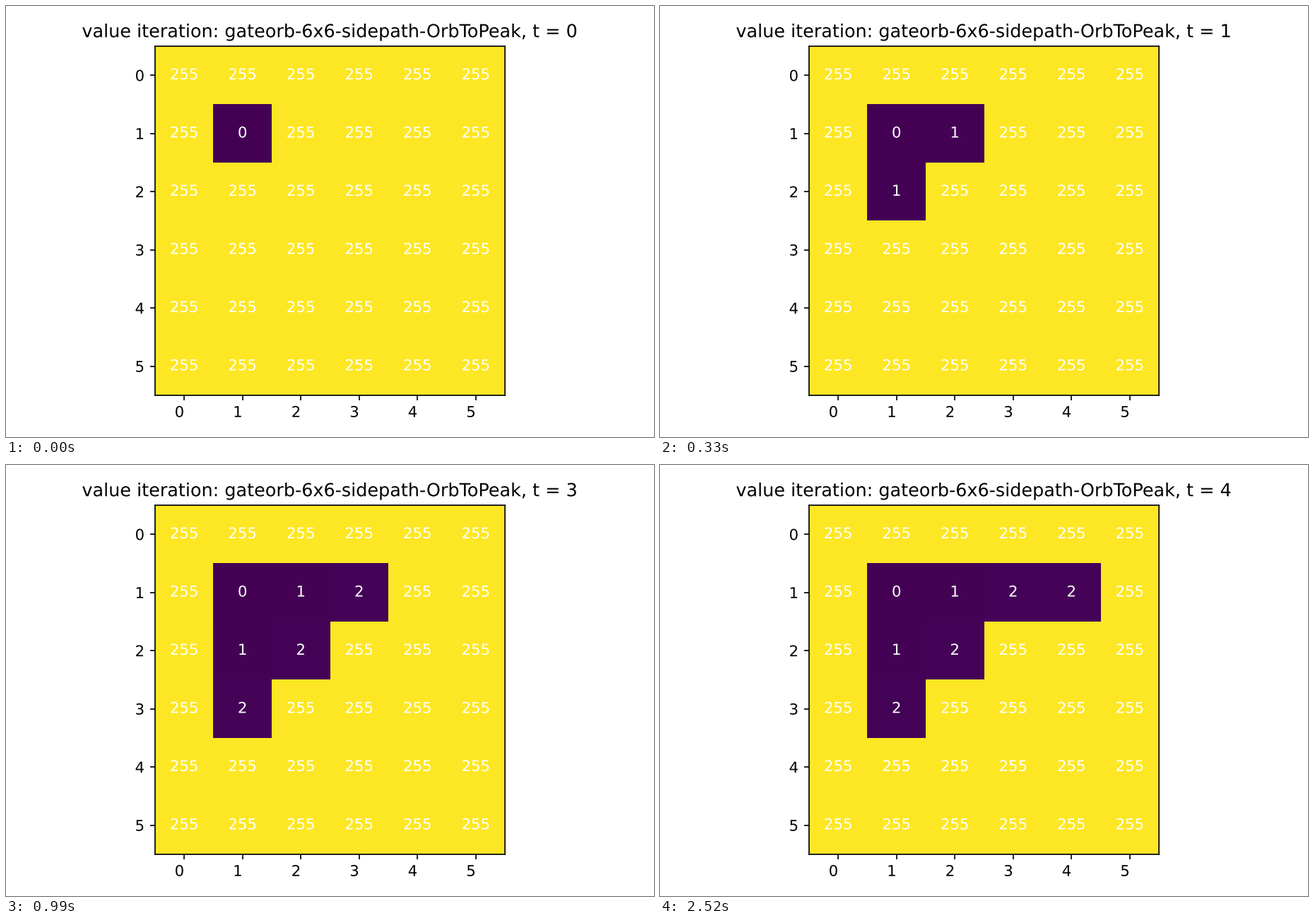
These frames come from a looping animation (917x611 px, 3.32 s). A matplotlib script:

```python
import numpy as np
import matplotlib.pyplot as plt
from matplotlib.animation import FuncAnimation
from matplotlib.patheffects import Normal
from matplotlib.text import Text

W, H, DPI = 917, 611, 128
PT = W / 6 / DPI          # point scale for a six inch wide figure
INTERVAL = 10             # ms per tick
LOOP = 3320
STEP = 330                # ms per iteration
LAST = 4
N = 6
UNSEEN = 255
TITLE = "value iteration: gateorb-6x6-sidepath-OrbToPeak, t = {}"

# (row, column, value, iteration at which the cell is reached)
REACHED = [
    (1, 1, 0, 0),
    (1, 2, 1, 1), (2, 1, 1, 1),
    (1, 3, 2, 2), (2, 2, 2, 2),
    (3, 1, 2, 3),
    (1, 4, 2, 4),
]

plt.rcParams.update({
    "font.family": "DejaVu Sans",
    "text.hinting": "none",
    "axes.linewidth": 0.8 * PT,
})


def values(t):
    grid = np.full((N, N), UNSEEN)
    for row, col, value, start in REACHED:
        if t >= start:
            grid[row, col] = value
    return grid


fig = plt.figure(figsize=(W / DPI, H / DPI), dpi=DPI, facecolor="white")
# layout on a 1200 x 800 canvas
left, top, side = 276, 74.6, 648
ax = fig.add_axes([left / 1200, 1 - (top + side) / 800, side / 1200, side / 800])
image = ax.imshow(values(0), cmap="viridis", vmin=0, vmax=UNSEEN,
                  interpolation="nearest", aspect="auto")
ax.set_xticks(range(N))
ax.set_yticks(range(N))
ax.tick_params(labelsize=10 * PT, length=3.5 * PT, width=0.8 * PT, pad=3.5 * PT)
plt.setp(ax.get_xticklabels(), ha="right")
plt.setp(list(ax.spines.values()), snap=False)
title = ax.set_title(TITLE.format(0), fontsize=12 * PT, pad=6 * PT)
labels = {
    (row, col): ax.text(col, row, "", color="white", fontsize=10 * PT,
                        ha="center", va="center")
    for row in range(N) for col in range(N)
}

# outlines keep text at fractional pixel positions
for text in fig.findobj(Text):
    text.set_path_effects([Normal()])


def update(i):
    t = min(i * INTERVAL // STEP, LAST)
    grid = values(t)
    image.set_data(grid)
    title.set_text(TITLE.format(t))
    for cell, label in labels.items():
        label.set_text(str(grid[cell]))
    return [image, title, *labels.values()]


anim = FuncAnimation(fig, update, frames=LOOP // INTERVAL, interval=INTERVAL,
                     init_func=lambda: update(0), repeat=True, repeat_delay=0)
plt.show()
```
